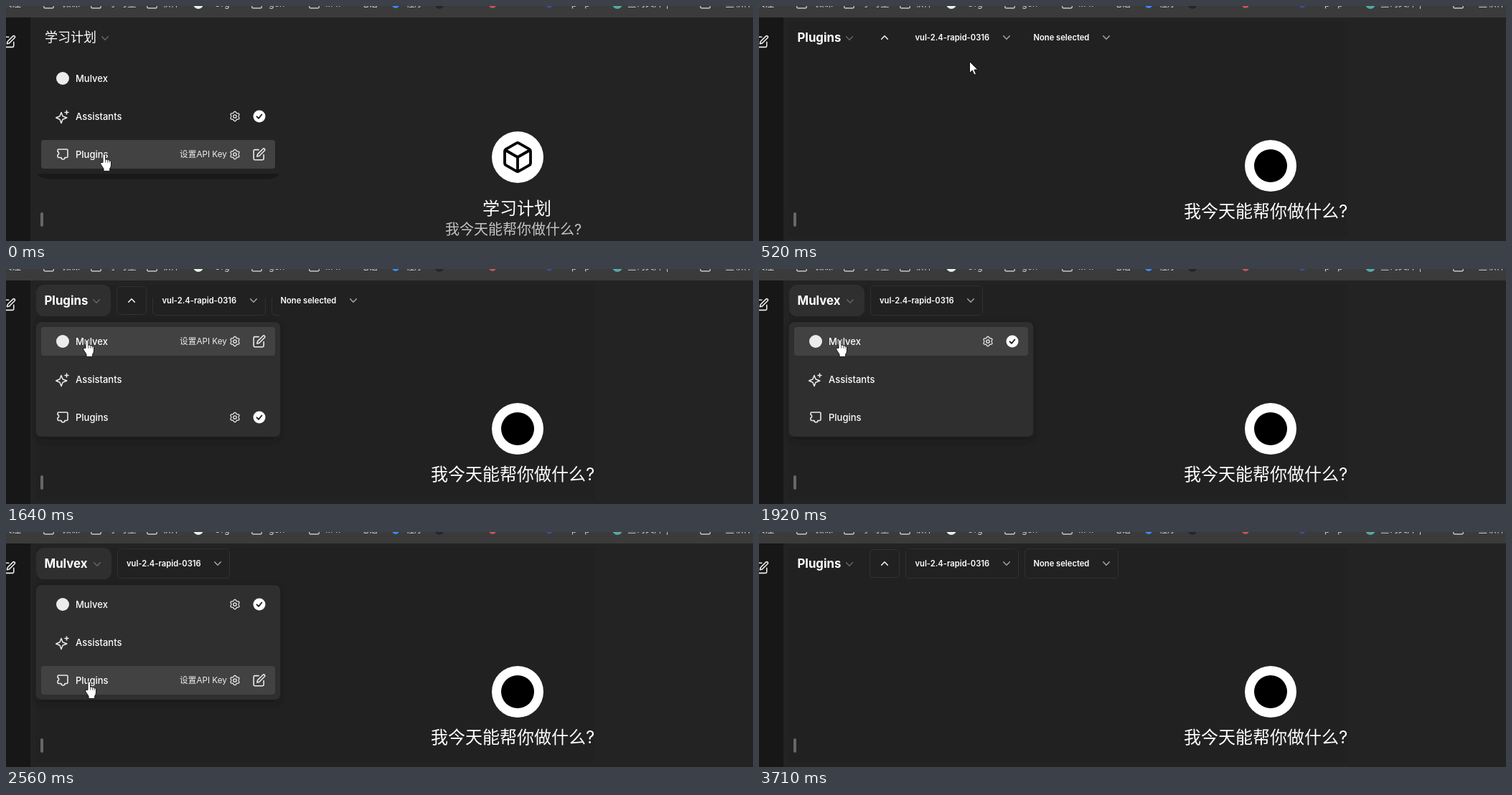
An HTML page that plays this animation: 1041x328 px, repeating every 4310 ms.

```html
<!DOCTYPE html>
<html lang="zh">
<head>
<meta charset="utf-8">
<title>Model menu</title>
<style>
html, body { margin: 0; width: 100%; height: 100%; overflow: hidden; background: #232323; }
svg { display: block; width: 1041px; height: 328px; }
text { font-family: Inter, "Noto Sans CJK SC", "Noto Sans CJK", sans-serif; fill: #fff; white-space: pre; }
.line { fill: none; stroke: #ececec; stroke-linecap: round; stroke-linejoin: round; }
</style>
</head>
<body>
<svg viewBox="0 0 1041 328" xmlns="http://www.w3.org/2000/svg">
  <defs>
    <clipPath id="reveal"><rect id="revealA" x="154" y="20" width="42"/><rect id="revealB" x="196"/></clipPath>
    <filter id="soft" x="-10%" y="-10%" width="120%" height="130%"><feGaussianBlur stdDeviation="4"/></filter>
  </defs>
  <rect width="1041" height="328" fill="#232323"/>
  <g id="view"></g>
  <g id="page"></g>
  <g id="cursor"></g>
</svg>
<script>
const LOOP = 4310;
const BRAND = 'Mulvex', MODEL = 'vul-2.4-rapid-0316', ASK = '我今天能帮你做什么?', PLAN = '学习计划';
const $ = id => document.getElementById(id);

const text = (x, y, s, size, weight = 500, fill = '#fff') =>
  `<text x="${x}" y="${y}" font-size="${size}" font-weight="${weight}" style="fill:${fill}">${s}</text>`;
const rect = (x, y, w, h, r, fill, extra = '') =>
  `<rect x="${x}" y="${y}" width="${w}" height="${h}" rx="${r}" fill="${fill}" ${extra}/>`;
const disc = (x, y, r, fill) => `<circle cx="${x}" cy="${y}" r="${r}" fill="${fill}"/>`;
const line = (d, width = 1.5, color = '#ececec', move = '') =>
  `<path class="line" d="${d}" style="stroke:${color};stroke-width:${width}" ${move && `transform="${move}"`}/>`;
const frame = (x, w, y = 23.5, h = 41) => rect(x + .5, y, w - 1, h, 5, 'none', 'stroke="#313131"');
const chevron = (x, y, color, up = 1, w = 4.3) =>
  line(`M${x - w} ${y - 2.2 * up}L${x} ${y + 2.2 * up}L${x + w} ${y - 2.2 * up}`, 1.4, color);

const edit = (x, y) => line('M11 4H4a2 2 0 0 0-2 2v14a2 2 0 0 0 2 2h14a2 2 0 0 0 2-2v-7' +
  'M18.5 2.5a2.1 2.1 0 0 1 3 3L12 15l-4 1 1-4z', 2, '#ececec', `translate(${x} ${y}) scale(.78)`);

function gear(x, y) {
  let d = '';
  for (let i = 0; i < 72; i++) {
    const a = i * Math.PI / 36, r = 5.9 + .8 * Math.cos(6 * a + Math.PI);
    d += (i ? 'L' : 'M') + (x + r * Math.cos(a)).toFixed(2) + ' ' + (y + r * Math.sin(a)).toFixed(2);
  }
  return line(d + 'Z', 1.3) + `<circle class="line" cx="${x}" cy="${y}" r="2.2" style="stroke-width:1.3"/>`;
}

const check = y => disc(353, y, 8.5, '#fff') + line(`M349.6 ${y + .3}l2.4 2.5 4.4-5.3`, 1.9, '#212121');

const rows = [
  { name: BRAND, y: 101, icon: disc(79, 101, 9, '#ececec') },
  { name: 'Assistants', y: 154, icon: line('M77 148.5L79 153.8L84.8 156L79 158.2L77 163.5L75 158.2L69.7 156L75 153.8ZM84.5 146v5M82 148.5h5') },
  { name: 'Plugins', y: 207, icon: line('M73.5 200h11q1.5 0 1.5 1.5v8.5q0 1.5-1.5 1.5h-2.5a2.5 2.5 0 0 1-5 0' +
    'h-3.5q-1.5 0-1.5-1.5v-2.2a2.4 2.4 0 0 0 0-4.6v-1.7q0-1.5 1.5-1.5z', 1.6) }
];

function menu(selected, hover, bare) {
  let s = bare
    ? '<path d="M43 234H381Q376 241.5 364 241.5H60Q48 241.5 43 234" fill="#191919"/>'
    : rect(43, 77, 338, 161, 8, '#171717', 'filter="url(#soft)" opacity=".6"') + rect(42, 74, 340, 160, 7, '#2f2f2f');
  rows.forEach((row, i) => {
    const { y } = row, over = i === hover, on = i === selected;
    if (over) s += rect(49, y - 20, 326, 40, 4, '#424242');
    s += row.icon + text(97, y + 4.7, row.name, 13);
    if (over || on) s += gear(319, y);
    if (over && !on) s += text(242, y + 4.3, '设置API Key', 11.7, 400, '#ececec') + edit(343.6, y - 9.5);
    if (on) s += check(y);
  });
  return s;
}

function header(kind, lit) {
  if (kind === 'plan') return text(54, 50, PLAN, 18) + chevron(138, 45, '#676767');
  const plug = kind === 'plug', label = (x, s) => text(x, 48, s, 11.2, 600);
  let s = lit ? rect(42, 22, plug ? 104 : 105, 44, 11, '#2f2f2f') : '';
  s += text(53.5, 50, plug ? 'Plugins' : BRAND, 16.8, 700) + chevron(plug ? 126 : 127, 45, '#676767');
  if (!plug) return s + frame(155, 157) + label(168, MODEL) + chevron(295, 44, '#a8a8a8');
  return s + `<g clip-path="url(#reveal)">${frame(154, 42, 24.5, 39)}${frame(204, 158)}${frame(370, 131)}</g>` +
    chevron(175, 44, '#fff', -1) + label(217.5, MODEL) + chevron(345, 44, '#a8a8a8') +
    label(382.5, 'None selected') + chevron(484, 44, '#a8a8a8');
}

function landing(plan) {
  if (!plan) return disc(713, 223, 36, '#fff') + disc(713, 223, 23, '#000') + text(592, 295, ASK, 24, 400);
  return disc(713, 211, 36, '#fff') +
    line('M21 8a2 2 0 0 0-1-1.73l-7-4a2 2 0 0 0-2 0l-7 4A2 2 0 0 0 3 8v8a2 2 0 0 0 1 1.73l7 4a2 2 0 0 0 2 0l7-4A2 2 0 0 0 21 16Z' +
      'M3.3 7l8.7 5 8.7-5M12 22V12', 1.9, '#000', 'translate(689 187) scale(2)') +
    text(664, 291, PLAN, 24) + text(612, 319, ASK, 20, 400, '#c4c4c4');
}

const shapes = {
  hand: 'M4 12.5V2.6q.2-1.9 1.8-1.9t1.8 1.9v5.6q1.6-.8 2.9.6 1.6-.6 2.6.8 2-.2 2.4 1.8v4.4q0 3-1.8 5.2v3.4H5v-3.2Q3 18 .8 14.4q-.6-2.2 1.4-2.2z',
  arrow: 'M.5.5v16l3.8-3.5 2.6 6 2.6-1.1-2.6-5.9h5z'
};

// Page and hover states, each held until the next one.
const states = [
  { t: 0, kind: 'plan', open: 1, sel: 1, hover: 2, bare: 1 },
  { t: 120, kind: 'plug' },
  { t: 670, kind: 'plug', edge: 321 },
  { t: 940, kind: 'plug', edge: 321, first: 1, lit: 1 },
  { t: 1370, kind: 'plug', edge: 382, first: 1, lit: 1, open: 1, sel: 2 },
  { t: 1490, kind: 'plug', edge: 382, first: 1, lit: 1, open: 1, sel: 2, hover: 0 },
  { t: 1920, kind: 'brand', lit: 1, open: 1, sel: 0, hover: 0 },
  { t: 2170, kind: 'brand', lit: 1, open: 1, sel: 0 },
  { t: 2440, kind: 'brand', lit: 1, open: 1, sel: 0, hover: 1 },
  { t: 2560, kind: 'brand', lit: 1, open: 1, sel: 0, hover: 2 },
  { t: 2850, kind: 'plug', edge: 510, first: 1, full: 1 }
];

// Pointer stops: time, shape, left, top.
const stops = [
  [0, 'hand', 131, 206], [120, 'arrow', 110, 148], [270, 'arrow', 162, 128], [400, 'arrow', 246, 92],
  [520, 'arrow', 293, 77], [670, 'arrow', 244, 58], [790, 'hand', 177, 42], [940, 'hand', 63, 35],
  [1060, 'hand', 93, 39], [1370, 'hand', 93, 62], [1490, 'hand', 97, 86], [1640, 'hand', 107, 98],
  [2040, 'hand', 98, 82], [2170, 'hand', 78, 56], [2320, 'hand', 84, 85], [2440, 'hand', 100, 148],
  [2560, 'hand', 110, 208], [2850, 'arrow', 249, 241], [3000, ''], [3560, 'arrow', 999, 318], [3710, '']
];

function drawPage() {
  let s = rect(0, 0, 34, 328, 0, '#171717') + rect(0, 0, 1041, 16, 0, '#3b3b3b') + edit(-4.8, 40.2);
  for (const x of [52, 118, 196, 342, 422, 967])
    s += rect(x + .7, -9, 13.6, 12, 2, 'none', 'stroke="#c8c8c8" stroke-width="1.3"');
  const tabs = [[-4, '关注'], [78, '微课'], [144, '学习堂'], [217, '软件'], [290, 'Org'], [366, 'gen'],
    [445, '... ..'], [493, '电话'], [557, '程序'], [788, 'p   p'], [866, '查询文库 |'], [990, '一些软件']];
  for (const [x, label] of tabs) s += text(x, 1, label, 12.5, 400, '#d8d8d8');
  const marks = [[268, -3, 7, '#e4f3e8'], [543, -2, 5, '#3b8cff'], [604, -2, 6, '#25252d'],
    [678, -2, 5, '#c9555a'], [757, -2, 4.5, '#3c4f9c'], [852, -3, 7, '#54aaa6']];
  for (const m of marks) s += disc(...m);
  $('page').innerHTML = s + rect(48, 288, 4, 20, 2, '#676767');
}

const set = (id, attrs) => Object.entries(attrs).forEach(([k, v]) => $(id).setAttribute(k, v));
let shownState, shownStop;

function draw(now) {
  const t = now % LOOP;
  const state = states.findLast(s => s.t <= t), stop = stops.findLast(s => s[0] <= t);
  if (state !== shownState) {
    const { kind, lit, open, sel, hover, bare, edge = 196, first, full } = state;
    const plan = kind === 'plan';
    set('revealA', { height: first ? 46 : 0 });
    set('revealB', { y: full ? 20 : 40, width: edge - 196, height: full ? 46 : 26 });
    $('view').innerHTML = (plan ? '' : rect(42, 22, 778, 300, 0, '#212121')) +
      header(kind, lit) + landing(plan) + (open ? menu(sel, hover, bare) : '');
    shownState = state;
  }
  if (stop !== shownStop) {
    const [, shape, x, y] = stop;
    $('cursor').innerHTML = shape
      ? `<path d="${shapes[shape]}" transform="translate(${x} ${y})" fill="#fff" stroke="#111" stroke-width="1" stroke-linejoin="round"/>` +
        (shape === 'hand' ? line('M7.6 8.2v4M10.5 9v3.2M13.1 10v2.4', .8, '#333', `translate(${x} ${y})`) : '')
      : '';
    shownStop = stop;
  }
}

drawPage();
const start = performance.now();
function tick() {
  draw(performance.now() - start);
  requestAnimationFrame(tick);
}
tick();
</script>
</body>
</html>
```
